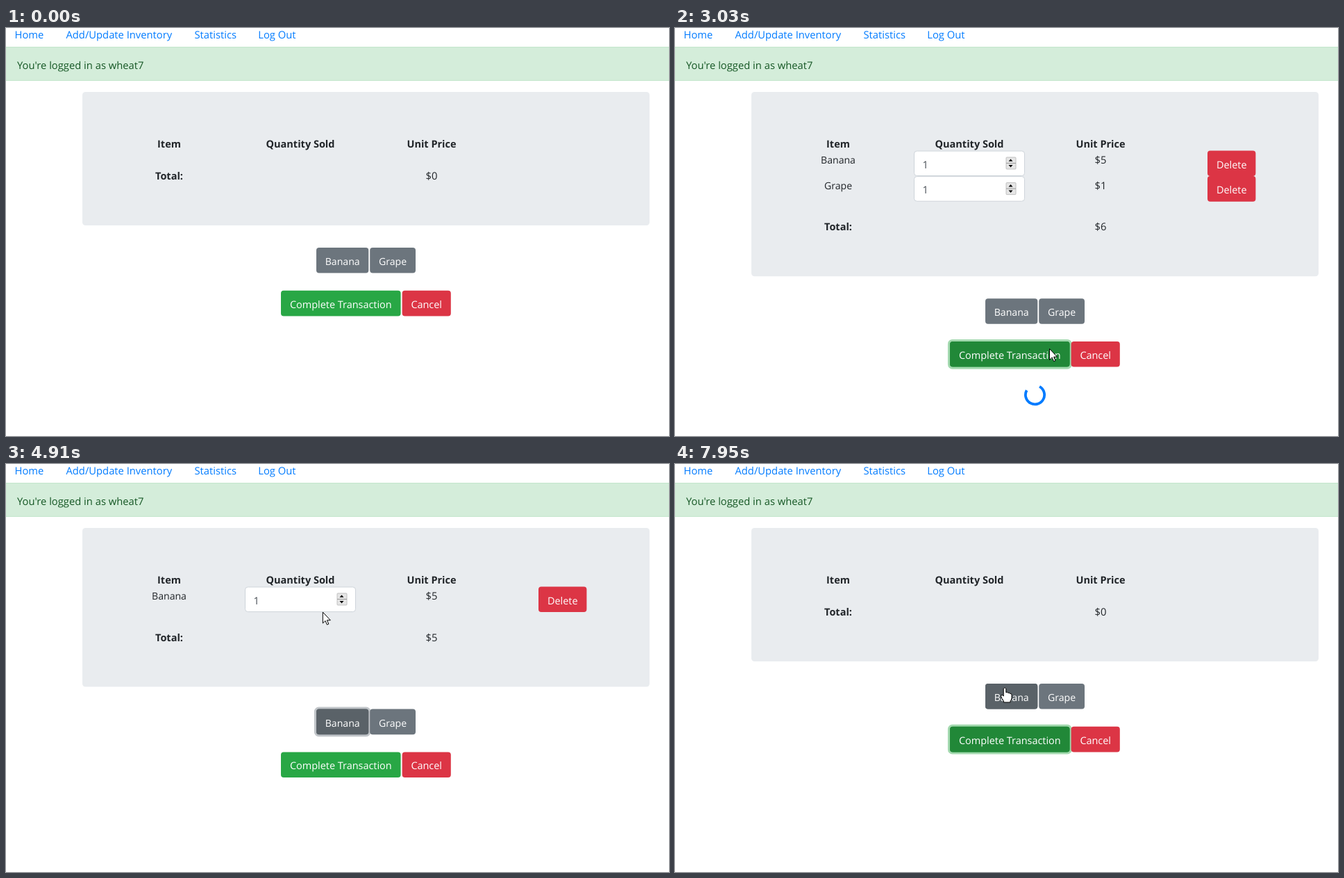
An HTML page that plays this animation: 955 by 587 pixels, repeating every 8000 ms.

```html
<!DOCTYPE html>
<html lang="en">
<head>
<meta charset="utf-8">
<title>Shop checkout</title>
<style>
  html, body { margin: 0; width: 100%; height: 100%; overflow: hidden; background: #fff; }
  svg { display: block; width: 100%; height: 100%; }
  text { font: 14.75px "Open Sans", "Noto Sans", sans-serif; fill: #212529; white-space: pre; text-rendering: geometricPrecision; }
  .mid { text-anchor: middle; }
  .bold { font-weight: 700; font-size: 14.5px; }
  .link { fill: #007bff; }
  .note { fill: #155724; }
  .label { fill: #fff; font-size: 14.45px; }
  .fruit { font-size: 14.1px; }
  .value { fill: #495057; }
  .ring { fill: none; stroke-width: 3.1; }
  .pointer { fill: #fff; stroke: #000; stroke-width: 1; stroke-linejoin: round; }
</style>
</head>
<body>
<svg id="stage" viewBox="0 0 955 587"></svg>
<script>
const LOOP = 8000, ROW = 36.6, FADE = 150;
const stage = document.getElementById('stage');

const text = (x, y, content, cls = '', id = '') =>
  `<text x="${x}" y="${y}" class="${cls}"${id && ` id="${id}"`}>${content}</text>`;
const rect = (x, y, w, h, r, attrs) =>
  `<rect x="${x}" y="${y}" width="${w}" height="${h}" rx="${r}" ${attrs}/>`;
const ring = (id, x, y, w, h, color) =>
  rect(x - 1.5, y - 1.5, w + 3, h + 3, 5, `id="${id}Ring" class="ring" stroke="${color}"`);

function button(id, x, y, w, label, fill, dark, glow, cls = '') {
  return (glow ? ring(id, x, y, w, 36.6, glow) : '') +
    rect(x, y, w, 36.6, 4, `fill="${fill}"`) +
    (dark ? rect(x, y, w, 36.6, 4, `id="${id}Dark" fill="${dark}"`) : '') +
    text(x + w / 2, y + 25, label, 'label mid ' + cls);
}

function itemRow(i, name, price) {
  const y = 176.5 + i * ROW;
  return `<g id="row${i}">` +
    text(235, y + 18.5, name, 'mid fruit') +
    rect(344.5, y + .5, 159, 35.6, 4, 'fill="#fff" stroke="#ced4da"') +
    (i ? '' : rect(344.5, y + .5, 159, 35.6, 4, 'id="inputEdge" fill="none" stroke="#80bdff"') +
      ring('input', 344, y, 160, 36.6, 'rgba(0,123,255,.28)')) +
    text(356.5, y + 25, '1', 'value', 'quantity' + i) +
    rect(477, y + 9.5, 14, 17, 1, 'fill="#e6e6e6" stroke="#b4b4b4" stroke-width=".8"') +
    `<path d="M477 ${y + 18}h14" stroke="#999"/>` +
    `<path d="M480.5 ${y + 15.3}h6l-3-3.4zM480.5 ${y + 20.5}h6l-3 3.4z"/>` +
    text(613, y + 18.5, price, 'mid') +
    button('delete' + i, 767, y, 69.4, 'Delete', '#dc3545') + '</g>';
}

stage.innerHTML =
  text(12.5, 14.5, 'Home', 'link') + text(86.5, 14.5, 'Add/Update Inventory', 'link') +
  text(271.5, 14.5, 'Statistics', 'link') + text(363.3, 14.5, 'Log Out', 'link') +
  rect(-2, 27.5, 959, 48, 0, 'fill="#d4edda" stroke="#c3e6cb"') +
  text(16, 58.5, "You're logged in as wheat7", 'note') +
  rect(110, 92, 817, 192, 4.5, 'id="panel" fill="#e9ecef"') +
  text(235, 171.8, 'Item', 'mid bold') + text(424, 171.8, 'Quantity Sold', 'mid bold') +
  text(613, 171.8, 'Unit Price', 'mid bold') +
  itemRow(0, 'Banana', '$5') + itemRow(1, 'Grape', '$1') +
  '<path id="caret" d="M0 186.5v18" stroke="#222"/>' +
  '<g id="lower">' +
  text(235, 218, 'Total:', 'mid bold') + text(613, 218, '$0', 'mid', 'total') +
  button('banana', 447, 316, 75.3, 'Banana', '#6c757d', '#5a6268', 'rgba(130,138,145,.5)', 'fruit') +
  button('grape', 524.2, 316, 65.8, 'Grape', '#6c757d', '#565d64', 'rgba(130,138,145,.5)', 'fruit') +
  button('complete', 396, 377.8, 172.6, 'Complete Transaction', '#28a745', '#218838', 'rgba(72,180,97,.5)') +
  button('cancel', 570.6, 377.8, 70.2, 'Cancel', '#dc3545') +
  '<circle id="spinner" r="13.6" fill="none" stroke="#007bff" stroke-width="3.8" pathLength="360" stroke-dasharray="270 90"/>' +
  '</g>' +
  '<circle id="click" r="12" fill="rgba(245,235,0,.55)"/>' +
  '<g id="cursor">' +
  '<path id="arrow" class="pointer" d="M.5.5V16.5L4.2 13 6.6 18.6 9 17.6 6.6 12.2H11.5Z"/>' +
  '<path id="hand" class="pointer" d="M-1.8 1.6Q0-1 1.8 1.6V7.2Q3.4 6 4.6 7.8 6.4 6.8 7.4 8.8 9.8 8 10 10.6V15Q9.8 17.6 8 19.4V21.4H-1.6V19.4Q-4.4 15.8-5.2 13 -5.8 10.2-3.4 10.8L-1.8 12.6Z"/>' +
  '<path id="beam" d="M-3-8.5h2.5l.5.5.5-.5h2.5M0-8V8M-3 8.5h2.5l.5-.5.5.5h2.5" fill="none" stroke="#000"/>' +
  '</g>';

const el = {};
stage.querySelectorAll('[id]').forEach(node => { el[node.id] = node; });

// [time, x, y] of the pointer tip
const path = [
  [60, 512, 528], [540, 485, 335], [930, 485, 335], [1280, 574, 369], [1635, 574, 369],
  [1700, 571, 392], [2180, 539, 461], [3270, 539, 461], [3650, 494.5, 333],
  [4430, 494.5, 333], [5020, 452, 200.7], [5550, 452, 200.7], [5740, 450, 218],
  [6000, 450, 218], [6500, 480, 423], [7570, 480, 423], [7940, 475, 321.5]
];
const shapes = [
  [0, ''], [60, 'arrow'], [480, 'hand'], [780, 'arrow'], [1180, 'hand'], [1560, 'arrow'],
  [2040, 'hand'], [2480, 'arrow'], [3590, 'hand'], [3980, 'arrow'], [4960, 'beam'],
  [5680, 'arrow'], [6470, 'hand'], [6900, 'arrow'], [7840, 'hand']
];
const rowCounts = [[0, 0], [780, 1], [1560, 2], [3090, 0], [3980, 1], [7210, 0]];
const totals = [[0, '$0'], [780, '$5'], [1560, '$6'], [3090, '$0'], [3980, '$5'], [6050, '$50'], [7210, '$0']];
const clicks = [[570, 740], [1330, 1500], [2260, 2430], [3730, 3900], [5050, 5210], [6780, 6880]];
const carets = [[5210, 5740], [6050, 6590]];
const spins = [[2502, 3090], [6890, 7210]];
// spans in which a layer is shown, fading at both ends
const layers = {
  bananaDark: [[420, 1400], [3590, 5230], [7780, 9000]],
  bananaRing: [[680, 1400], [3900, 5230]],
  grapeDark: [[1180, 2300]],
  grapeRing: [[1420, 2300]],
  completeDark: [[2050, 4100], [6450, 9000]],
  completeRing: [[2320, 3880], [6820, 9000]],
  inputRing: [[5210, 6820]],
  inputEdge: [[5210, 6820]]
};

const clamp = v => Math.max(0, Math.min(1, v));
const latest = (table, t) => table.filter(step => step[0] <= t).pop()[1];
const active = (spans, t) => spans.find(([from, to]) => t >= from && t < to);
const show = (node, on) => node.setAttribute('visibility', on ? 'visible' : 'hidden');
const place = (node, x, y, turn = 0) =>
  node.setAttribute('transform', `translate(${x} ${y}) rotate(${turn})`);

function pointerAt(t) {
  const i = path.findIndex(step => step[0] > t);
  if (i === 0) return path[0].slice(1);
  if (i < 0) return path[path.length - 1].slice(1);
  const [t0, x0, y0] = path[i - 1], [t1, x1, y1] = path[i];
  const u = (t - t0) / (t1 - t0), s = u * u * (3 - 2 * u);
  return [x0 + (x1 - x0) * s, y0 + (y1 - y0) * s];
}

function render(t) {
  const rows = latest(rowCounts, t), typed = t >= 6050 && t < 7210;
  el.panel.setAttribute('height', 192 + rows * ROW);
  show(el.row0, rows > 0);
  show(el.row1, rows > 1);
  place(el.lower, 0, rows * ROW);
  el.total.textContent = latest(totals, t);
  el.quantity0.textContent = typed ? '10' : '1';

  for (const [id, spans] of Object.entries(layers)) {
    const level = spans.map(([from, to]) => clamp((t - from) / FADE) - clamp((t - to) / FADE));
    el[id].setAttribute('opacity', Math.max(...level));
  }

  show(el.caret, active(carets, t));
  place(el.caret, typed ? 373.5 : 365.5, 0);

  const spin = active(spins, t);
  show(el.spinner, spin);
  if (spin) place(el.spinner, 518.5, 454.6, 45 + (t - spin[0]) / 750 * 360);

  const [x, y] = pointerAt(t), shape = latest(shapes, t);
  place(el.cursor, x, y);
  place(el.click, x, y);
  show(el.click, active(clicks, t));
  for (const id of ['arrow', 'hand', 'beam']) show(el[id], id === shape);
}

const start = performance.now();
function tick() {
  render((performance.now() - start) % LOOP);
  requestAnimationFrame(tick);
}
tick();
</script>
</body>
</html>
```
